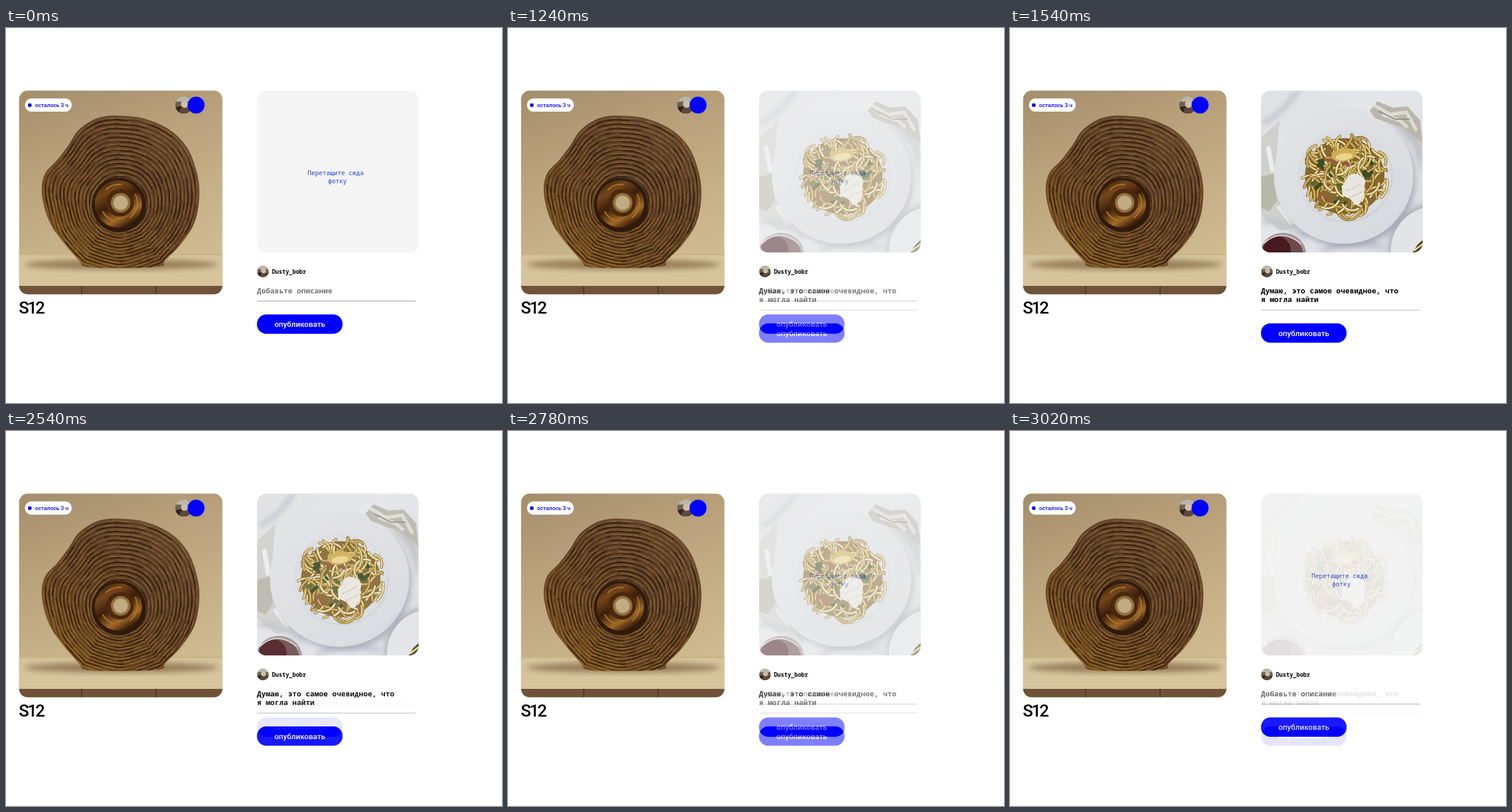
An HTML page for the animation above (3.08 s loop, 861 by 650 pixels).

```html
<!DOCTYPE html>
<html lang="ru">
<head>
<meta charset="utf-8">
<title>Публикация фотки</title>
<style>
  html, body { margin: 0; width: 100%; height: 100%; overflow: hidden; background: #fff; }
  svg { display: block; }
  text { font-family: Roboto, Inter, sans-serif; font-weight: 500; white-space: pre; }
  .mono { font-family: "Noto Sans Mono", "DejaVu Sans Mono", monospace; font-weight: 600; }
  .drop { font-size: 10.85px; fill: #1f3fd0; font-weight: 500; }
  .field { font-size: 12.83px; }
  .line { stroke: #a9a9a9; stroke-width: 1.2; }
</style>
</head>
<body>
<svg width="861" height="650" viewBox="0 0 861 650">
  <defs>
    <clipPath id="leftClip"><rect x="22.700" y="108.600" width="353" height="353" rx="15"/></clipPath>
    <clipPath id="rightClip"><rect x="435.700" y="108.600" width="280.500" height="280.300" rx="16"/></clipPath>
    <clipPath id="round"><circle r="10"/></clipPath>
    <clipPath id="vaseClip"><path id="vaseEdge"/></clipPath>
    <filter id="soft" x="-30%" y="-30%" width="160%" height="160%"><feGaussianBlur stdDeviation="5"/></filter>
    <linearGradient id="wall" x2=".35" y2="1">
      <stop stop-color="#a48d6a"/><stop offset=".45" stop-color="#bca57e"/><stop offset="1" stop-color="#d0bb91"/>
    </linearGradient>
    <linearGradient id="bronze" x1=".1" y1="1" x2=".8" y2=".1">
      <stop stop-color="#8e6420"/><stop offset=".35" stop-color="#694621"/>
      <stop offset=".65" stop-color="#5a3d24"/><stop offset="1" stop-color="#6b4c30"/>
    </linearGradient>
    <linearGradient id="funnel" x2=".6" y2="1">
      <stop stop-color="#2b1608"/><stop offset=".3" stop-color="#74461a"/>
      <stop offset=".55" stop-color="#3b1e0a"/><stop offset=".82" stop-color="#a06a28"/><stop offset="1" stop-color="#3a1f0a"/>
    </linearGradient>
    <linearGradient id="linen" x2="1" y2="1">
      <stop stop-color="#dfe0e3"/><stop offset=".4" stop-color="#e5e6e9"/><stop offset="1" stop-color="#d8dbe2"/>
    </linearGradient>
    <linearGradient id="china" x2=".7" y2="1">
      <stop stop-color="#e3e4e7"/><stop offset="1" stop-color="#d7dade"/>
    </linearGradient>
    <g id="avatar" clip-path="url(#round)">
      <rect x="-10" y="-10" width="20" height="20" fill="#6b6250"/>
      <rect x="-10" y="-10" width="20" height="6" fill="#b9b6ac"/>
      <path d="M-10 3Q-4 0 1 3T10 1V10H-10Z" fill="#33241b"/>
      <path d="M-5 10Q-5 2 1 2T8 10Z" fill="#5d483d"/>
      <circle cx="1" cy="-1" r="4.3" fill="#cdbda7"/>
    </g>
    <g id="publish">
      <rect x="435.700" y="496.500" width="148.500" height="33.500" rx="16" fill="#00f"/>
      <text x="466" y="518" font-size="13.400" fill="#fff">опубликовать</text>
    </g>
  </defs>

  <!-- Task card -->
  <g clip-path="url(#leftClip)">
    <rect x="22" y="108" width="355" height="354" fill="url(#wall)"/>
    <rect x="22" y="393" width="355" height="55" fill="#d6c49c"/>
    <rect x="22" y="391" width="355" height="3" fill="#c9b388"/>
    <ellipse cx="200" cy="410" rx="168" ry="9" fill="#7d623f" opacity=".7" filter="url(#soft)"/>
    <rect x="22" y="447" width="355" height="15" fill="#6f5338"/>
    <path d="M131.500 447V462M260.500 447V462" stroke="#3f2c1c" stroke-width="1.500"/>
    <g clip-path="url(#vaseClip)">
      <rect x="55" y="145" width="290" height="280" fill="url(#bronze)"/>
      <g id="rings" fill="none"/>
      <circle cx="196" cy="307" r="47" fill="#2f1b0c"/>
      <circle cx="195" cy="305" r="41" fill="url(#funnel)"/>
      <circle cx="196" cy="303" r="32" fill="none" stroke="#b0772f" stroke-width="2" stroke-dasharray="30 30 25 40"/>
      <circle cx="198" cy="303" r="24" fill="#4a290d"/>
      <circle cx="199" cy="303" r="17" fill="#94703f"/>
      <circle cx="199" cy="303" r="12.500" fill="#c0ab82"/>
    </g>
  </g>
  <rect x="33" y="122" width="81" height="23" rx="11.500" fill="#fff"/>
  <circle cx="41.300" cy="133.700" r="3.200" fill="#00f"/>
  <text x="50.500" y="137.300" font-size="9.700" fill="#00f">осталось 3 ч</text>
  <use href="#avatar" transform="translate(308.500 133.500) scale(1.470)"/>
  <circle cx="330" cy="133.600" r="14.700" fill="#00f"/>
  <text x="22.300" y="494.500" font-size="29.500" letter-spacing="-2.900">S12</text>

  <!-- Empty form -->
  <rect x="435.700" y="108.600" width="281" height="280.300" rx="16" fill="#f5f5f5"/>
  <text class="mono drop" x="523.500" y="255">Перетащите сюда</text>
  <text class="mono drop" x="559" y="269">фотку</text>
  <text class="mono field" x="435.500" y="459.500" fill="#757575">Добавьте описание</text>
  <path class="line" d="M436 473.300H711"/>
  <use href="#publish"/>

  <!-- Filled form -->
  <g id="filled" opacity="0">
    <rect x="430" y="104" width="292" height="446" fill="#fff"/>
    <g clip-path="url(#rightClip)">
      <rect x="435" y="108" width="282" height="282" fill="url(#linen)"/>
      <path d="M436 190L468 160L462 230L468 300L500 345L470 352L436 325Z" fill="#d0d0cc"/>
      <path d="M436 258L458 252L463 300L450 318L436 312Z" fill="#b9b8aa"/>
      <path d="M448 205L456 250M466 308L490 340" stroke="#eceded" stroke-width="8"/>
      <g filter="url(#soft)">
        <path d="M436 335Q480 335 515 365M500 109Q470 150 440 165M540 389Q580 365 650 380" fill="none" stroke="#b9bec8" stroke-width="7"/>
        <ellipse cx="584" cy="264" rx="120" ry="117" fill="#8c929c" opacity=".6"/>
      </g>
      <ellipse cx="579" cy="256" rx="121" ry="118" fill="url(#china)"/>
      <ellipse cx="582" cy="257" rx="83" ry="80" fill="#cfd2d6"/>
      <ellipse cx="580" cy="255" rx="82" ry="79" fill="#dadce0"/>
      <path d="M650 150L690 150L716 200V260L700 205L676 178Z" fill="#9da0a2" opacity=".5" filter="url(#soft)"/>
      <path d="M624 143L638 127L664 138L690 136L712 160L716 200L698 184L682 172L660 166L634 156Z" fill="#bab6ab"/>
      <path d="M632 134L660 150L688 146L706 178M646 150L676 160L690 172" fill="none" stroke="#dedbd4" stroke-width="6" stroke-linejoin="round"/>
      <path d="M640 144L668 158L694 158" fill="none" stroke="#918d82" stroke-width="2"/>
      <circle cx="735" cy="382" r="78" fill="#8f949e" opacity=".6" filter="url(#soft)"/>
      <circle cx="738" cy="386" r="77" fill="#e2e4e6"/>
      <path d="M699 389L707 376L717 367V389Z" fill="#45401f"/>
      <path d="M701 386L717 374" stroke="#e7d48d" stroke-width="3"/>
      <ellipse cx="474" cy="392" rx="40" ry="37" fill="#a09594"/>
      <ellipse cx="472" cy="394" rx="37" ry="35" fill="#6d4a4b"/>
      <ellipse cx="463" cy="385" rx="24" ry="24" fill="#48191f"/>
      <path d="M440 374Q470 345 505 374" fill="none" stroke="#ded9d9" stroke-width="2"/>
      <g id="pasta" fill="none" stroke-linecap="round"/>
      <ellipse cx="580" cy="220" rx="22" ry="11" fill="#cfae52" transform="rotate(-8 580 220)"/>
      <ellipse cx="580" cy="223" rx="15" ry="6" fill="#e8d48c" transform="rotate(-8 580 223)"/>
      <path d="M576 274Q582 268 586 258Q595 249 607 255Q622 262 614 276Q616 290 610 298Q608 309 597 306Q594 295 577 291Z" fill="#e9e6df"/>
      <path d="M584 282Q599 276 611 268M590 294Q602 288 611 284" fill="none" stroke="#bcb5a5" stroke-width="2.500" stroke-dasharray="2 3"/>
    </g>
    <text class="mono field" x="435.500" y="459.500">Думаю, это самое очевидное, что</text>
    <text class="mono field" x="435.500" y="475">я могла найти</text>
    <path class="line" d="M436 489H711"/>
    <use href="#publish" y="15.500"/>
  </g>

  <use href="#avatar" transform="translate(446 422)"/>
  <text class="mono" x="461.700" y="425.500" font-size="9.900">Dusty_bobr</text>
</svg>
<script>
const $ = id => document.getElementById(id);

function addPath(parent, attrs) {
  const path = document.createElementNS("http://www.w3.org/2000/svg", "path");
  for (const key in attrs) path.setAttribute(key, attrs[key]);
  parent.append(path);
}

let seed = 11;
const rnd = () => (seed = seed * 16807 % 2147483647) / 2147483647;
const pick = list => list[Math.floor(rnd() * list.length)];

// Closed Catmull-Rom curve through the points
function smooth(pts) {
  const at = i => pts[(i + pts.length) % pts.length];
  const ctrl = (p, a, b) => [p[0] + (b[0] - a[0]) / 6, p[1] + (b[1] - a[1]) / 6];
  return "M" + pts[0] + pts.map((p, i) => {
    const q = at(i + 1);
    return "C" + [ctrl(p, at(i - 1), q), ctrl(q, at(i + 2), p), q].join(" ");
  }).join("") + "Z";
}

const outline = [[197, 152], [240, 157], [285, 177], [316, 210], [333, 258], [335, 300], [326, 340],
  [303, 375], [276, 403], [268, 413], [200, 416], [140, 414], [126, 402], [92, 362], [72, 328],
  [62, 284], [68, 252], [88, 230], [108, 204], [125, 178], [150, 160], [172, 153]];
$("vaseEdge").setAttribute("d", smooth(outline));

// Rings stay round below, where the foot cuts them off
const ring = f => smooth(outline.map(([x, y]) => {
  const dx = x - 198, dy = y - 305, r = Math.hypot(dx, dy);
  const k = (47 + (Math.max(r, 128) - 47) * f) / r;
  return [198 + dx * k, 305 + dy * k];
}));

// Broken strokes give the hammered look
const dashes = (min, max) => Array.from({ length: 12 }, () => min + rnd() * (max - min)).join(" ");
for (let i = 0; i < 14; i++) {
  const add = (shift, stroke, width, dash, opacity) => addPath($("rings"), {
    d: ring((i + shift) / 14), stroke, "stroke-width": width, "stroke-dasharray": dash, opacity
  });
  add(.5, "#94683a", 4, "1 1.5", .5);
  add(0, "#2a180a", 2.2, dashes(8, 70), .65);
  add(.1, "#2a180a", 2, "none", .4);
  add(.35, "#c08a45", 1.2, dashes(4, 30), .5);
}

// Random point in the bowl
function spot(radius) {
  const a = rnd() * 2 * Math.PI, r = radius * Math.sqrt(rnd());
  return [581 + r * Math.cos(a), 257 + r * Math.sin(a) * .96];
}

function strand() {
  const [x, y] = spot(74), turn = rnd() * 2 * Math.PI, len = 18 + rnd() * 26;
  let ex = x + len * Math.cos(turn), ey = y + len * Math.sin(turn);
  const far = Math.max(1, Math.hypot(ex - 581, ey - 257) / 73);
  ex = 581 + (ex - 581) / far;
  ey = 257 + (ey - 257) / far;
  const r = 15 + rnd() * 22;
  const d = `M${x} ${y}A${r} ${r} 0 0 ${rnd() < .5 ? 0 : 1} ${ex} ${ey}`;
  addPath($("pasta"), { d, stroke: "#6f5526", "stroke-width": 4.8 });
  addPath($("pasta"), { d, stroke: pick(["#e4cb78", "#d0ae58", "#efe0a6"]), "stroke-width": 3.2 });
}

function scrap(color, size) {
  const [x, y] = spot(62);
  const d = `M${x} ${y}l${(rnd() - .5) * size} ${(rnd() - .5) * size}`;
  addPath($("pasta"), { d, stroke: color, "stroke-width": 4 + rnd() * 5 });
}

addPath($("pasta"), { d: "M512 257a69 66 0 1 0 138 0a69 66 0 1 0 -138 0", fill: "#86682f" });
for (let i = 0; i < 125; i++) {
  strand();
  if (i > 60 && i % 3 == 0) scrap(pick(["#3a4c22", "#566b31"]), 16);
  if (i > 60 && i % 8 == 1) scrap("#975743", 16);
}

// Dissolve in tenths, one step every 60 ms
function frame() {
  const t = performance.now() % 3080;
  const step = start => Math.min(1, Math.max(0, Math.floor((t - start) / 60) + 1) / 10);
  $("filled").setAttribute("opacity", step(1000) - step(2540));
  requestAnimationFrame(frame);
}
frame();
</script>
</body>
</html>
```
